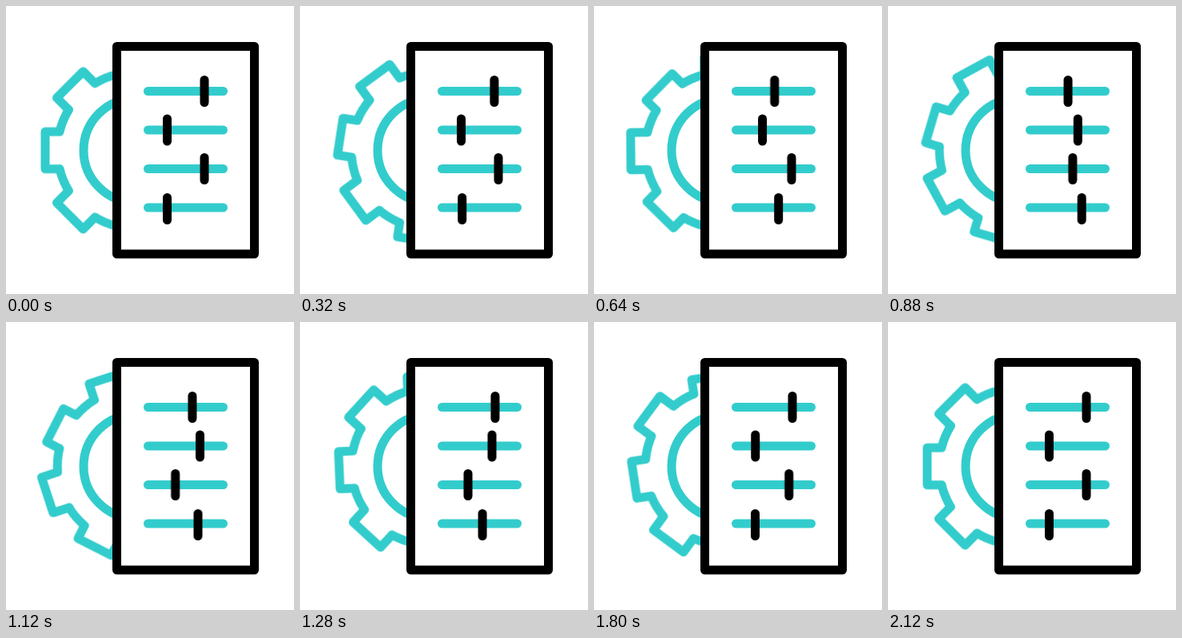
Recreate the animation shown at these times as an HTML page. Size 360 px wide and 360 px high, loop 2.16 s.

```html
<!DOCTYPE html>
<html lang="en">
<head>
<meta charset="utf-8">
<title>Settings panel</title>
<style>
  html, body { margin: 0; width: 100%; height: 100%; overflow: hidden; background: #fff; }
  svg { display: block; width: 100%; height: 100%; }
  .line { fill: none; stroke-width: 11; stroke-linecap: round; stroke-linejoin: round; }
  .cyan { stroke: #33cccc; }
  .black { stroke: #000; }

  .gear { animation: spin 2160ms infinite; }
  .knob { animation: slide 2160ms var(--wait) infinite; }

  @keyframes spin {
    0% { transform: rotate(0deg); animation-timing-function: cubic-bezier(.62, 0, .38, 1); }
    98.15%, 100% { transform: rotate(360deg); }
  }
  @keyframes slide {
    0% { transform: translateX(0); animation-timing-function: cubic-bezier(.62, 0, .38, 1); }
    34.72% { transform: translateX(var(--shift)); animation-timing-function: cubic-bezier(.62, 0, .38, 1); }
    69.44%, 100% { transform: translateX(0); }
  }
</style>
</head>
<body>
<svg viewBox="0 0 360 360">
  <defs>
    <!-- one tooth plus the rim up to the next one -->
    <path id="short" d="M-95 23.3H-113V-23.3H-95A97.8 97.8 0 0 1 -83.65 -50.7"/>
    <path id="long" d="M-95 23.3H-116V-23.3H-95A97.8 97.8 0 0 1 -83.65 -50.7"/>
    <g id="pair">
      <use href="#short"/>
      <use href="#long" transform="rotate(45)"/>
    </g>
    <path id="track" d="M177.5 0H271.5"/>
    <path id="knob" d="M0 -14V14"/>
  </defs>

  <g transform="translate(162 180.4)">
    <g class="gear line cyan">
      <use href="#pair"/>
      <use href="#pair" transform="rotate(90)"/>
      <use href="#pair" transform="rotate(180)"/>
      <use href="#pair" transform="rotate(270)"/>
    </g>
    <circle class="line cyan" r="65"/>
  </g>

  <rect class="line black" x="138.5" y="50.5" width="172" height="259.5" style="fill:#fff"/>

  <g class="line cyan">
    <use href="#track" y="106.5"/>
    <use href="#track" y="155"/>
    <use href="#track" y="203.5"/>
    <use href="#track" y="252"/>
  </g>
  <g class="line black">
    <g class="knob" style="--wait:40ms; --shift:-23.3px"><use href="#knob" x="248" y="106.5"/></g>
    <g class="knob" style="--wait:360ms; --shift:41px"><use href="#knob" x="201.5" y="155"/></g>
    <g class="knob" style="--wait:520ms; --shift:-38px"><use href="#knob" x="248" y="203.5"/></g>
    <g class="knob" style="--wait:200ms; --shift:41px"><use href="#knob" x="201.5" y="253.5"/></g>
  </g>
</svg>
</body>
</html>
```
